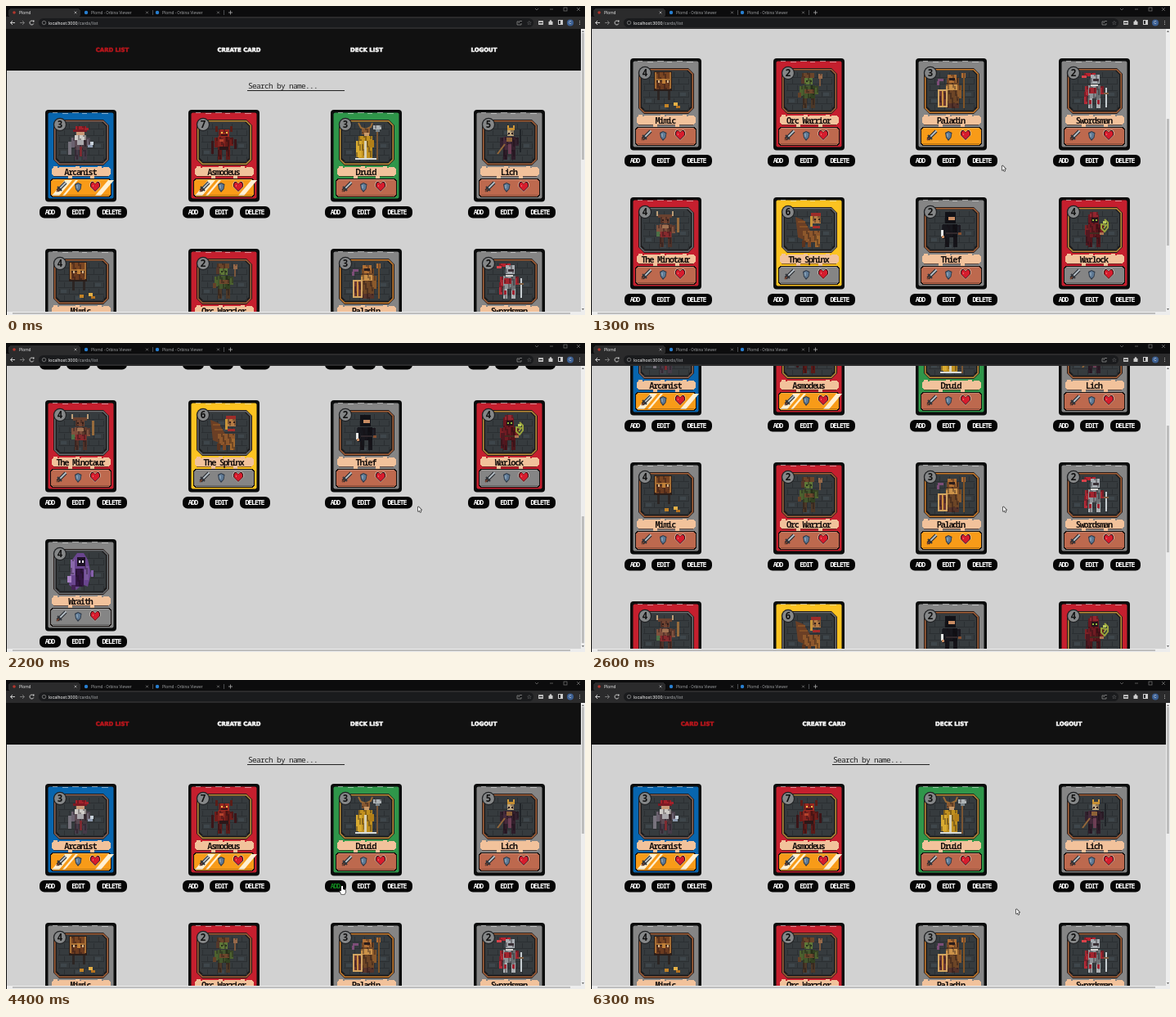
Write an HTML page with a canvas that moves like this. It is 708 by 378 pixels and loops after 7200 ms.

```html
<!DOCTYPE html>
<html lang="en">
<head>
<meta charset="utf-8">
<title>Card list</title>
<style>
html, body { margin: 0; width: 100%; height: 100%; overflow: hidden; background: #d2d2d2; }
canvas { display: block; width: 708px; height: 378px; }
</style>
</head>
<body>
<canvas id="stage" width="708" height="378"></canvas>
<script>
const g = document.getElementById('stage').getContext('2d');
const LOOP = 7200, STEP = 100;
const MONO = '"Noto Sans Mono", "DejaVu Sans Mono", monospace';
const SANS = 'Roboto, "Open Sans", sans-serif';
const WIDE = '"DejaVu Sans", sans-serif';

function r(color, x, y, w, h) {
  g.fillStyle = color;
  g.fillRect(x, y, w, h);
}

// sprite part: a block with pixel shading
function p(color, x, y, w, h) {
  r(color, x, y, w, h);
  if (w < 4 || h < 4) return;
  for (let i = 0; i < w - 1; i += 2) {
    for (let j = 0; j < h - 1; j += 2) {
      const n = (i * 7 + j * 5 + x * 3 + y) % 11;
      if (n < 4) r('rgba(20,14,18,.35)', x + i, y + j, 2, 2);
    }
  }
}

// box with stepped pixel corners
function box(color, x, y, w, h, c) {
  const m = Math.ceil(c / 2);
  r(color, x + c, y, w - 2 * c, h);
  r(color, x, y + c, w, h - 2 * c);
  r(color, x + m, y + m, w - 2 * m, h - 2 * m);
}

function round(color, x, y, w, h, rad) {
  g.fillStyle = color;
  g.beginPath();
  g.roundRect(x, y, w, h, rad);
  g.fill();
}

function text(s, x, y, font, color, align = 'left', gap = 0) {
  g.font = font;
  g.fillStyle = color;
  g.textAlign = align;
  g.letterSpacing = gap + 'px';
  g.fillText(s, x + (align === 'center' ? gap / 2 : 0), y);
}

function line(color, width, ...pts) {
  g.strokeStyle = color;
  g.lineWidth = width;
  g.beginPath();
  for (let i = 0; i < pts.length; i += 2) g.lineTo(pts[i], pts[i + 1]);
  g.stroke();
}

function shape(color, ...pts) {
  g.fillStyle = color;
  g.beginPath();
  for (let i = 0; i < pts.length; i += 2) g.lineTo(pts[i], pts[i + 1]);
  g.fill();
}

function disc(color, x, y, rad) {
  g.fillStyle = color;
  g.beginPath();
  g.arc(x, y, rad, 0, 7);
  g.fill();
}

// torso, arms and legs shared by the walking figures
function body(coat, arm, leg) {
  p(coat, 36, 33, 15, 16);
  r('rgba(0,0,0,.25)', 45, 33, 6, 16);
  p(arm, 32, 34, 4, 12);
  p(arm, 51, 34, 4, 10);
  p(leg, 36, 49, 5, 12);
  p(leg, 46, 49, 5, 12);
}

const art = {
  Arcanist() {
    body('#5b4a53', '#6b6270', '#463a48');
    p('#a3212a', 37, 20, 13, 4); r('#7d1a24', 34, 24, 17, 3); r('#a3212a', 48, 22, 5, 3);
    r('#c99a78', 38, 27, 10, 4); p('#cfccc8', 36, 31, 14, 6); r('#aaa8ac', 39, 37, 8, 6);
    r('#77737d', 28, 39, 4, 16); r('#c9d3dc', 55, 39, 4, 4); r('#8e9bb0', 52, 43, 6, 3);
    r('#7d2a31', 42, 45, 3, 12);
  },
  Asmodeus() {
    body('#85241f', '#701d1a', '#5c1a18');
    r('#3b1518', 28, 38, 3, 16); r('#3b1518', 56, 36, 3, 12);
    r('#5b1d17', 33, 20, 3, 7); r('#5b1d17', 51, 20, 3, 7);
    p('#9c2a21', 37, 24, 13, 9); r('#f0c04a', 40, 27, 2, 2); r('#f0c04a', 46, 27, 2, 2);
    r('#3a1416', 40, 30, 8, 2); r('#b5432d', 38, 36, 5, 3); r('#2b1718', 38, 45, 11, 4);
  },
  Druid() {
    line('#9b6b35', 2, 34, 16, 37, 22, 43, 24, 49, 21, 51, 16);
    p('#8a5a32', 38, 23, 10, 7); r('#c89a6a', 41, 28, 6, 4);
    p('#c0901f', 34, 32, 17, 27); p('#d9ab30', 31, 38, 7, 20); r('#d8d0b4', 41, 38, 3, 21);
    r('#b37f18', 47, 37, 6, 9); r('#7a5533', 56, 26, 2, 35);
    p('#aeb4b6', 52, 19, 10, 5); r('#7c858a', 55, 24, 5, 3); r('#d9dcda', 30, 59, 26, 2);
  },
  Lich() {
    body('#452a3b', '#32212e', '#2e1d29');
    r('#c48f34', 41, 22, 9, 3); r('#d39b38', 41, 19, 2, 3); r('#d39b38', 48, 19, 2, 3);
    p('#bfa880', 41, 25, 8, 7); r('#2a1b20', 42, 28, 2, 2); r('#2a1b20', 46, 28, 2, 2);
    line('#94673a', 2, 29, 54, 38, 42); r('#8f6337', 40, 34, 7, 5);
    r('#202428', 56, 24, 2, 28); r('#6d3e54', 42, 42, 4, 12);
  },
  Mimic() {
    r('#2a1e1a', 29, 16, 22, 24); p('#7a4522', 30, 17, 20, 9); p('#6b3b20', 31, 28, 18, 10);
    r('#a66d33', 30, 25, 20, 2); r('#a66d33', 30, 17, 2, 20); r('#a66d33', 48, 17, 2, 20);
    r('#c08038', 39, 25, 4, 6); r('#d8b688', 34, 27, 2, 3); r('#d8b688', 45, 27, 2, 3);
    r('#2c2523', 33, 40, 3, 11); r('#2c2523', 46, 40, 3, 11);
    r('#c48426', 42, 56, 5, 4); r('#e4b046', 53, 54, 5, 4); r('#b77320', 56, 58, 5, 3);
  },
  'Orc Warrior'() {
    body('#43562d', '#4d622f', '#4d3827');
    p('#6b452a', 35, 18, 15, 6); r('#54372a', 34, 23, 4, 8); p('#5f7838', 38, 24, 10, 8);
    r('#26301d', 40, 27, 2, 2); r('#26301d', 45, 27, 2, 2); p('#6d472b', 38, 38, 12, 5);
    r('#7b563b', 56, 20, 2, 14); p('#96694a', 55, 19, 5, 6); r('#654129', 30, 42, 4, 6);
  },
  Paladin() {
    p('#6d4526', 38, 24, 15, 34); p('#b06f34', 39, 20, 11, 10); r('#2a1d1b', 41, 24, 7, 3);
    p('#cc9249', 37, 32, 14, 7); p('#8b592b', 51, 33, 5, 16); p('#56332a', 38, 55, 15, 6);
    r('#d2a562', 27, 38, 12, 22); p('#6c3834', 29, 40, 8, 18); r('#cf8f3d', 32, 40, 2, 18);
    r('#7d4d78', 27, 25, 7, 3); r('#7d4d78', 26, 28, 3, 5);
    r('#815324', 58, 18, 2, 43); p('#b06f34', 56, 18, 5, 6);
  },
  Swordsman() {
    body('#8f9498', '#a22731', '#aeb1b4');
    p('#b8232f', 31, 18, 14, 4); r('#d9424a', 28, 21, 6, 3); p('#a9aeb3', 39, 20, 11, 11);
    r('#3a3036', 42, 25, 7, 3); p('#a3252f', 37, 36, 9, 7); r('#d8d5d3', 39, 32, 9, 2);
    p('#b32a36', 31, 41, 4, 15); r('#9e2330', 37, 51, 3, 5); r('#9e2330', 47, 51, 3, 5);
    r('#c7ced2', 57, 36, 2, 24); r('#806044', 55, 42, 6, 2);
  },
  'The Minotaur'() {
    body('#7e4d3b', '#80523e', '#4f3229');
    r('#bd9e77', 32, 17, 2, 6); r('#bd9e77', 51, 17, 2, 6); r('#69412f', 34, 21, 17, 4);
    p('#704331', 37, 24, 11, 8); r('#2e1c19', 39, 27, 2, 2); r('#2e1c19', 45, 27, 2, 2);
    p('#872a2d', 37, 42, 13, 7); r('#a07252', 39, 34, 8, 4);
    r('#4d7147', 32, 42, 4, 6); r('#976b3c', 57, 25, 3, 18);
  },
  'The Sphinx'() {
    shape('#6b3f25', 27, 24, 37, 28, 45, 41, 40, 53, 30, 49);
    r('#855027', 30, 29, 9, 2); r('#855027', 32, 35, 10, 2); p('#8d572c', 36, 41, 21, 14);
    r('#5b341f', 35, 53, 4, 8); r('#7b4724', 42, 54, 4, 7); p('#a0682f', 51, 47, 6, 14);
    r('#9d2d29', 46, 19, 12, 4); r('#c9953a', 45, 23, 3, 13); p('#b57c45', 48, 23, 10, 9);
    r('#33201c', 50, 26, 2, 2); r('#33201c', 55, 26, 2, 2); r('#a62b2a', 48, 35, 9, 3);
  },
  Thief() {
    body('#17171d', '#1e1f26', '#15151a');
    r('#121217', 36, 18, 13, 14); r('#c88c63', 40, 24, 8, 4); r('#121217', 40, 28, 8, 3);
    r('#17171d', 33, 33, 4, 18); r('#30282c', 37, 43, 14, 2);
    r('#e7e8e6', 31, 40, 3, 8); r('#c88c63', 32, 47, 3, 3); r('#854e30', 52, 43, 4, 3);
  },
  Warlock() {
    body('#701b22', '#7f2126', '#4d171c');
    p('#6a171f', 36, 21, 13, 12); p('#932630', 38, 18, 10, 6); r('#22151a', 40, 25, 8, 6);
    r('#93b83c', 41, 27, 2, 2); r('#93b83c', 45, 27, 2, 2); p('#511820', 33, 40, 5, 19);
    line('#9aa53c', 2, 56, 27, 60, 31, 60, 37, 56, 42, 52, 38, 52, 33, 58, 34, 55, 38);
    r('#b7c95a', 54, 29, 4, 3); r('#ad7550', 50, 43, 5, 3); r('#422b20', 38, 43, 12, 2);
  },
  Wraith() {
    shape('#69458e', 33, 25, 39, 17, 47, 17, 52, 25, 56, 42, 52, 58, 45, 55, 38, 62, 29, 56);
    p('#8a69ab', 31, 25, 5, 19); p('#7a589d', 48, 33, 5, 17); r('#1e1226', 39, 22, 10, 11);
    r('#eee6f3', 41, 26, 2, 3); r('#eee6f3', 45, 26, 2, 3); p('#321543', 37, 36, 10, 22);
    r('#aa84c6', 27, 45, 5, 8); r('#452456', 32, 56, 5, 6); r('#8660ab', 56, 38, 3, 8);
  }
};

const BLUE = '#0865ae', RED = '#c51f2e', GREEN = '#2f964a', GRAY = '#858585', GOLD = '#fcc321';
const CLAY = '#bd694e', ORANGE = '#f89b18', COPPER = '#a8633a', STEEL = '#6c6f72', BRASS = '#c0903a';
const cards = [
  ['Arcanist', 3, BLUE, ORANGE, '#8b6759', true],
  ['Asmodeus', 7, RED, ORANGE, BRASS, true],
  ['Druid', 3, GREEN, CLAY, BRASS],
  ['Lich', 5, GRAY, CLAY, COPPER],
  ['Mimic', 4, GRAY, CLAY, COPPER],
  ['Orc Warrior', 2, RED, CLAY, COPPER],
  ['Paladin', 3, GRAY, ORANGE, '#cf802f'],
  ['Swordsman', 2, GRAY, CLAY, COPPER],
  ['The Minotaur', 4, RED, CLAY, STEEL],
  ['The Sphinx', 6, GOLD, GRAY, STEEL],
  ['Thief', 2, GRAY, CLAY, COPPER],
  ['Warlock', 4, RED, GRAY, BRASS],
  ['Wraith', 4, GRAY, GRAY, STEEL]
];

function octagon(color, x, y, w, h, c) {
  shape(color, x + c, y, x + w - c, y, x + w, y + c, x + w, y + h - c,
    x + w - c, y + h, x + c, y + h, x, y + h - c, x, y + c);
}

function bricks() {
  octagon('#363b3e', 14, 15, 60, 49, 5);
  for (let j = 0; j < 6; j++) {
    const y = 17 + j * 8;
    r('#2b2f32', 16, y + 6, 56, 1);
    for (let i = 0; i < 5; i++) {
      const x = 17 + i * 12 + (j % 2) * 6;
      if (x < 72) r('#2b2f32', x, y, 1, 6);
      if ((i * 3 + j) % 4 === 0 && x < 64) r('#3e464b', x + 2, y + 1, 7, 4);
    }
  }
}

function stats(color, shiny) {
  box('#17110f', 6, 84, 75, 23, 2);
  box(color, 7, 85, 73, 21, 2);
  if (shiny) {
    for (const [x, w] of [[8, 9], [21, 3], [61, 7]]) {
      shape('#fff0d2', x + 16, 86, x + 16 + w, 86, x + w, 105, x, 105);
    }
  }
  r('rgba(0,0,0,.25)', 9, 104, 69, 1);
  r('rgba(255,255,255,.2)', 10, 85, 67, 1);
  line('#24272c', 4, 15, 99, 25, 89);
  line('#b4bdc4', 2, 17, 97, 25.5, 88.5);
  line('#704030', 2, 14, 100, 17, 97);
  line('#30353b', 2, 15, 94, 20, 99);
  shape('#2e3947', 36, 91, 40, 89, 44.5, 91, 43.5, 97, 40, 101, 37, 97);
  shape('#5f7a96', 37, 92, 40, 90, 43.5, 92, 42.5, 97, 40, 99, 38, 97);
  r('#829bb0', 38, 92, 2, 4);
  heart('#ead5cc', 6.5);
  heart('#3a1214', 6);
  heart('#d61c2d', 5);
  r('#f0656d', 58, 92, 1, 2);
}

function heart(color, s) {
  const x = 61, y = 94;
  shape(color, x, y - s * .6, x + s * .4, y - s, x + s * .75, y - s, x + s, y - s * .6, x + s, y,
    x, y + s, x - s, y, x - s, y - s * .6, x - s * .75, y - s, x - s * .4, y - s);
}

function banner(color) {
  r('rgba(60,25,15,.6)', 10, 81, 67, 1);
  box('#f2c29b', 8, 70, 72, 11, 2);
  for (let i = 0; i < 8; i++) {
    r('#f2c29b', 10 + i * 9, 69 + i % 3 * 6, 5, 6);
    if (i % 3 === 0) r(color, 15 + i * 9, 70, 2, 1);
  }
}

function card([name, cost, color, bar, frame, shiny]) {
  round('#0b0c0c', 0, 0, 87, 112.5, 4);
  round(color, 3.5, 3.5, 80, 105, 2);
  for (let i = 0; i < 6; i++) r('rgba(255,255,255,.5)', 9 + i * 12, 3 + i % 2, 6 + i % 3, 1);
  octagon('#241a18', 10, 12, 68, 56, 7);
  octagon(frame, 11, 13, 66, 54, 6);
  octagon('#1b1a1b', 12.5, 14.5, 63, 51, 5);
  bricks();
  art[name]();
  disc('#202224', 18, 18, 8.2);
  disc('#858788', 18, 18, 6.9);
  text(cost, 18, 22, 'bold 11.5px ' + MONO, '#111', 'center');
  banner(color);
  text(name, 43.5, 79.5, 'bold 10.4px ' + MONO, '#17100e', 'center', -1.34);
  stats(bar, shiny);
}

const buttons = [['ADD', -7, 26], ['EDIT', 26, 29], ['DELETE', 63, 37]];

function drawCards(scroll, mouse) {
  cards.forEach((c, i) => {
    const x = Math.round(48 + (i % 4) * 174.7);
    const y = 127 + Math.floor(i / 4) * 170 - scroll;
    if (y > 378 || y < -120) return;
    g.save();
    g.translate(x, y);
    card(c);
    for (const [label, bx, w] of buttons) {
      const mx = mouse.x - x - bx, my = mouse.y - y - 118;
      const over = mouse.on && mx > 0 && mx < w && my > 0 && my < 15;
      round('#050505', bx, 118, w, 14.5, 6);
      text(label, bx + w / 2, 128, 'bold 8.2px ' + MONO, over ? '#128a20' : '#fff', 'center', -1.1);
    }
    g.restore();
  });
}

const links = [['CARD LIST', 130], ['CREATE CARD', 285], ['DECK LIST', 441], ['LOGOUT', 584.5]];

function drawPage(scroll, mouse) {
  r('#d2d2d2', 1, 28, 702, 346);
  r('#111', 1, 28 - scroll, 702, 51);
  links.forEach(([s, x], i) => {
    const color = i ? '#f4f4f4' : '#b5161c';
    text(s, x, 56 - scroll, 'bold 6.9px ' + WIDE, color, 'center');
    g.strokeStyle = color;
    g.lineWidth = .6;
    g.strokeText(s, x, 56 - scroll);
  });
  text('Search by name...', 296, 101 - scroll, '9.5px ' + MONO, '#222', 'left', -0.7);
  r('#222', 295, 103 - scroll, 119, 1);
  drawCards(scroll, mouse);
  r('#ededed', 703, 28, 5, 350);
  r('#ededed', 0, 374, 708, 4);
  r('#bdbdbd', 704, 33 + scroll * .451, 3, 155);
  r('#bdbdbd', 8, 375, 682, 2);
  shape('#666', 704, 32, 705.5, 30, 707, 32);
  shape('#666', 704, 370, 705.5, 372, 707, 370);
  r('#111', 0, 28, 1, 350);
}

function cross(x, y, d, color) {
  line(color, .7, x - d, y - d, x + d, y + d);
  line(color, .7, x + d, y - d, x - d, y + d);
}

function drawBrowser() {
  r('#0c0c0d', 0, 0, 708, 14);
  r('#2b2b2c', 0, 13, 708, 15);
  box('#2b2b2c', 3, 3, 88, 11, 2);
  disc('#b3362d', 10, 8, 1.8);
  text('Plomd', 16, 10, '5px ' + SANS, '#ddd');
  cross(85, 8, 1.4, '#bbb');
  for (const x of [98, 185]) {
    disc('#287fd0', x, 8, 2.2);
    text('Plomd - Orbina Viewer', x + 6, 10, '5px ' + SANS, '#96989a');
    cross(x + 74.5, 8, 1.4, '#888');
    r('#4b4c4f', x + 81, 5, 1, 6);
  }
  line('#aaa', .8, 272, 8, 277, 8);
  line('#aaa', .8, 274.5, 5.5, 274.5, 10.5);
  line('#777', .7, 647, 3, 649, 5, 651, 3);
  line('#777', .7, 665, 4, 669, 4);
  g.strokeRect(682, 2, 4, 4);
  cross(700, 4, 2, '#777');

  line('#ccc', 1, 8, 18, 5.5, 20.5, 8, 23);
  line('#ccc', 1, 5.5, 20.5, 11, 20.5);
  line('#777', 1, 20, 18, 22.5, 20.5, 20, 23);
  line('#777', 1, 17, 20.5, 22.5, 20.5);
  g.strokeStyle = '#ccc';
  g.beginPath();
  g.arc(31.5, 20.5, 2.5, .4, 5.6);
  g.stroke();
  r('#ccc', 33, 17.5, 1.5, 2);
  round('#1a1b1d', 40, 15, 605, 11, 5.5);
  g.strokeStyle = '#999';
  g.lineWidth = .7;
  g.beginPath();
  g.arc(46.5, 20.5, 2.2, 0, 7);
  g.stroke();
  text('localhost:3000', 52, 22.5, '5.4px ' + SANS, '#eee');
  const end = 52 + g.measureText('localhost:3000').width;
  text('/cards/list', end, 22.5, '5.4px ' + SANS, '#a2a4a7');

  line('#999', .7, 627, 19, 625, 19, 625, 23, 630, 23, 630, 21);
  line('#999', .7, 627, 21, 628, 18.5, 631, 18.5);
  text('☆', 640, 23, '7px ' + WIDE, '#aaa', 'center');
  r('#bbb', 651, 18, 6, 5);
  r('#2b2b2c', 652, 20, 4, 1);
  r('#ccc', 663.5, 19, 5, 4);
  disc('#ccc', 666, 18.5, 1.3);
  g.strokeStyle = '#ccc';
  g.lineWidth = 1;
  g.strokeRect(675.5, 17.5, 5, 5);
  r('#ccc', 678, 18, 3, 5);
  disc('#3b5f93', 690, 20.5, 4);
  text('C', 690, 22.3, '5px ' + SANS, '#ddd', 'center');
  for (let i = 0; i < 3; i++) r('#aaa', 701, 18 + i * 2, 1, 1);
}

function drawMouse({ x, y, on, hand }) {
  if (!on) return;
  g.save();
  g.translate(x, y);
  g.lineJoin = 'round';
  const pts = hand
    ? [-1, 0, 1, 0, 1, 4, 4, 5, 4, 8, 3, 10, -1, 10, -3, 6, -1, 6, -1, 0]
    : [0, 0, 0, 6, 1.5, 4.8, 2.4, 7, 3.3, 6.6, 2.4, 4.5, 4.2, 4.2, 0, 0];
  line('#111', 1.2, ...pts);
  shape('#fff', ...pts);
  g.restore();
}

// linear track through [time, value] pairs
function track(t, keys) {
  for (let i = 1; i < keys.length; i++) {
    const [a, u] = keys[i - 1], [b, v] = keys[i];
    if (t < b) return u + (v - u) * Math.max(0, (t - a) / (b - a));
  }
  return keys[keys.length - 1][1];
}

const scrollKeys = [[700, 0], [900, 63], [1300, 233], [1700, 397], [2250, 397], [2600, 151], [2900, 0]];
const xKeys = [[500, 502], [2200, 504], [3400, 504], [4000, 411], [5300, 411], [5500, 417], [6200, 520]];
const yKeys = [[500, 192], [900, 192], [1300, 195], [2200, 200], [3400, 200], [4000, 252], [5300, 252], [5500, 270], [6200, 280]];

function draw(t) {
  const scroll = Math.round(track(t, scrollKeys));
  const mouse = { x: track(t, xKeys), y: track(t, yKeys), on: t >= 500 };
  mouse.hand = t >= 4000 && t < 5400;
  drawPage(scroll, mouse);
  drawBrowser();
  drawMouse(mouse);
}

const start = performance.now();
let last = -1;
function tick() {
  const t = Math.floor((performance.now() - start) % LOOP / STEP) * STEP;
  if (t !== last) draw(last = t);
  requestAnimationFrame(tick);
}
tick();
</script>
</body>
</html>
```
